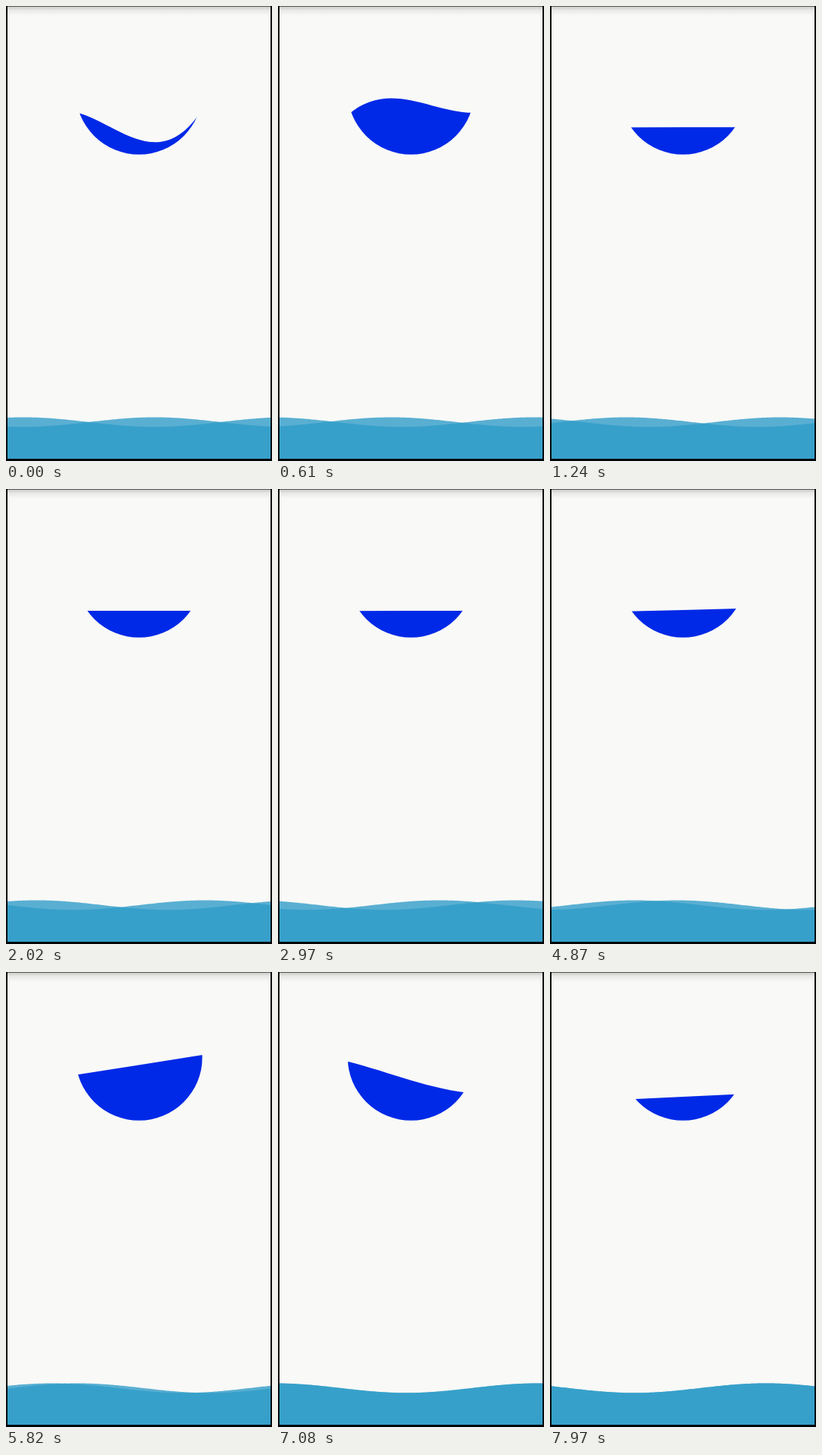
These frames come from a looping animation (356x609 px, 8 s). An HTML page with a canvas:

```html
<!DOCTYPE html>
<html>
<head>
<meta charset="utf-8">
<style>
  html, body { margin: 0; width: 100%; height: 100%; overflow: hidden; background: #000; }
  canvas { display: block; width: 356px; height: 609px; }
</style>
</head>
<body>
<canvas id="stage" width="356" height="609"></canvas>
<script>
const ctx = document.getElementById('stage').getContext('2d');
const LOOP = 8000;
const LEFT = 2, RIGHT = 354, BOTTOM = 606, SPAN = RIGHT - LEFT;
const BALL = { x: 178, y: 114, r: 84.8 };
const REST = 163;

// Flat-topped bump that rises to 1 around the time `center`.
const pulse = (t, center, width) => Math.exp(-(((t - center) / width) ** 4));

// Heights of the liquid at both walls and at the two inner control points.
function surfaceAt(t) {
  const drain = 8 * (t / LOOP) ** 4;
  const left = REST + drain - 21 * pulse(t, 0, 900) - 58 * pulse(t, 6560, 794);
  const right = REST - 25 * pulse(t, 0, 900) - 52 * pulse(t, 5900, 800);
  const slosh = phase => 88 * pulse(t, 0, 700) * Math.cos(t / 390 + phase);
  const rebound = 10 * pulse(t, 7080, 500);
  return [
    left,
    left + (right - left) / 3 + slosh(1.39),
    right + (left - right) / 3 + slosh(0) + rebound,
    right
  ];
}

function drawBackground() {
  ctx.fillStyle = '#000';
  ctx.fillRect(0, 0, 356, 609);
  ctx.fillStyle = '#f9f9f7';
  ctx.fillRect(LEFT, 0, SPAN, BOTTOM);
  const shade = ctx.createLinearGradient(0, 0, 0, 13);
  shade.addColorStop(0, 'rgba(0,0,0,.22)');
  shade.addColorStop(0.4, 'rgba(0,0,0,.07)');
  shade.addColorStop(1, 'rgba(0,0,0,0)');
  ctx.fillStyle = shade;
  ctx.fillRect(LEFT, 0, SPAN, 13);
  ctx.fillStyle = '#555';
  ctx.fillRect(LEFT, 0, SPAN, 1);
}

function drawLiquid([y0, y1, y2, y3]) {
  const { x, y, r } = BALL;
  ctx.save();
  ctx.beginPath();
  ctx.arc(x, y, r, 0, 2 * Math.PI);
  ctx.clip();
  ctx.beginPath();
  ctx.moveTo(x - r, y0);
  ctx.bezierCurveTo(x - r / 3, y1, x + r / 3, y2, x + r, y3);
  ctx.lineTo(x + r, y + r + 1);
  ctx.lineTo(x - r, y + r + 1);
  ctx.fillStyle = '#0029e7';
  ctx.fill();
  ctx.restore();
}

function drawWave(crest) {
  ctx.beginPath();
  ctx.moveTo(LEFT, BOTTOM);
  for (let x = LEFT; x <= RIGHT; x += 2) {
    ctx.lineTo(x, 556.9 - 6.4 * Math.cos((x - crest) / SPAN * 2 * Math.PI));
  }
  ctx.lineTo(RIGHT, BOTTOM);
  ctx.fillStyle = 'rgba(47,156,200,.785)';
  ctx.fill();
}

// Both waves run left; the rear one catches up until they coincide.
function drawSea(t) {
  const middle = 111 - 1.5 * SPAN * t / LOOP;
  const gap = SPAN / 2 * Math.max(0, 1 - t / 7200);
  drawWave(middle - gap / 2);
  drawWave(middle + gap / 2);
}

function render() {
  const t = performance.now() % LOOP;
  drawBackground();
  drawLiquid(surfaceAt(t));
  drawSea(t);
  requestAnimationFrame(render);
}
render();
</script>
</body>
</html>
```
